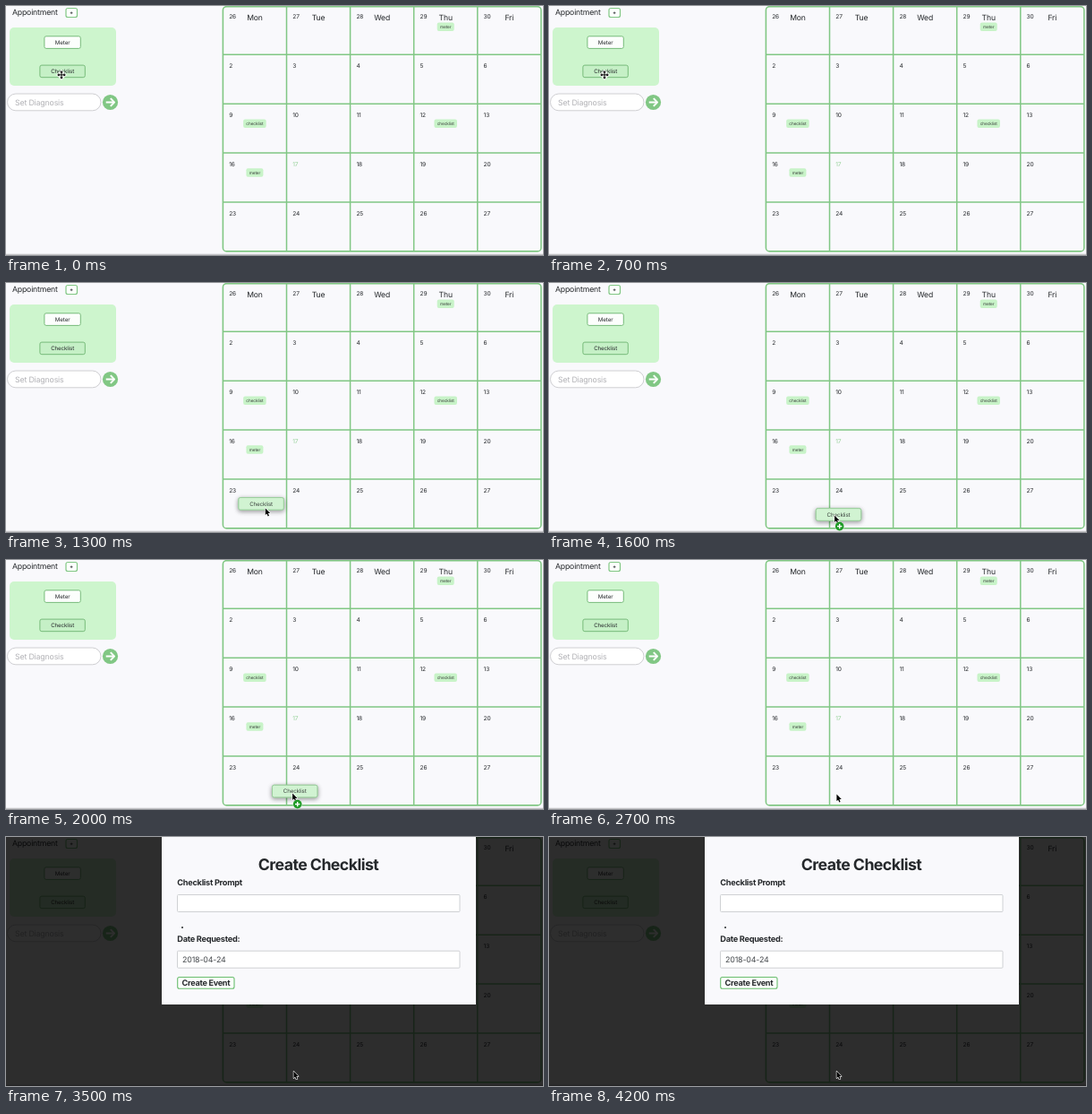
These frames come from a looping animation (600x278 px, 4.3 s). An HTML page with a canvas:

```html
<!DOCTYPE html>
<html lang="en">
<head>
<meta charset="utf-8">
<title>Drag a checklist onto the calendar</title>
<style>
  html, body { margin: 0; width: 100%; height: 100%; overflow: hidden; background: #f9f9fc; }
  canvas { display: block; width: 600px; height: 278px; }
</style>
</head>
<body>
<canvas id="stage"></canvas>
<script>
const W = 600, H = 278, LOOP = 4300, STEP = 100;
const DRAG_START = 900, DRAG_TIME = 600, DRAG_END = DRAG_START + DRAG_TIME;
const DROP = 2500, MODAL_START = 2800;
const PAGE = '#f9f9fc', INK = '#25282b', GREEN = '#81c784', MINT = '#cdf5cd';

const canvas = document.getElementById('stage');
const ctx = canvas.getContext('2d');
const ratio = window.devicePixelRatio || 1;
canvas.width = W * ratio;
canvas.height = H * ratio;

const clamp = k => Math.min(1, Math.max(0, k));
const mix = (a, b, k) => a + (b - a) * k;
const easeInOut = (k, power) =>
  k < 0.5 ? (2 * k) ** power / 2 : 1 - (2 - 2 * k) ** power / 2;

// The sideways move sets off earlier than the fall, which bends the path.
function dragTo(t, from, to) {
  const k = clamp((t - DRAG_START) / DRAG_TIME);
  return [mix(from[0], to[0], easeInOut(k, 3)), mix(from[1], to[1], easeInOut(k, 5))];
}

const settled = t => clamp((t - DRAG_END) / (DROP - DRAG_END));

function ghostAt(t) {
  const [x, y] = dragTo(t, [63, 73], [323.7, 258.6]);
  return [x - 2 * settled(t), y - settled(t)];
}

function pointerAt(t) {
  const lead = 17;
  const [x, y] = dragTo(t + lead, [63, 77], [318.8, 259.2]);
  return [x + 2.6 * settled(t), y + 2.4 * settled(t)];
}

function text(str, x, y, size, { color = INK, bold = false, align = 'left' } = {}) {
  ctx.font = `${bold ? 700 : 400} ${size}px Inter, "Open Sans", sans-serif`;
  ctx.letterSpacing = `${(bold ? -0.03 : -0.02) * size}px`;
  ctx.textRendering = 'geometricPrecision';
  ctx.textAlign = align;
  ctx.fillStyle = color;
  ctx.fillText(str, x, y);
}

function box(x, y, w, h, r, fill, stroke, line = 1) {
  ctx.beginPath();
  ctx.roundRect(x, y, w, h, r);
  if (fill) {
    ctx.fillStyle = fill;
    ctx.fill();
  }
  if (stroke) {
    ctx.strokeStyle = stroke;
    ctx.lineWidth = line;
    ctx.stroke();
  }
}

function line(color, width, x0, y0, x1, y1) {
  ctx.beginPath();
  ctx.moveTo(x0, y0);
  ctx.lineTo(x1, y1);
  ctx.strokeStyle = color;
  ctx.lineWidth = width;
  ctx.stroke();
}

function plus(x, y, reach, width, color) {
  line(color, width, x - reach, y, x + reach, y);
  line(color, width, x, y - reach, x, y + reach);
}

function disc(x, y, r, color) {
  ctx.beginPath();
  ctx.arc(x, y, r, 0, Math.PI * 2);
  ctx.fillStyle = color;
  ctx.fill();
}

function button(label, x, y, w, fill, border = '#76bb79', color = INK) {
  const h = 13.6;
  box(x - w / 2, y - h / 2, w, h, 2, fill, border);
  text(label, x, y + 2.3, 6.2, { align: 'center', color });
}

function chip(label, x, y, w) {
  box(x - w / 2, y - 4.8, w, 9.6, 2, '#c8f3c8');
  text(label, x, y + 1.6, 4.75, { align: 'center', color: '#3a403c' });
}

function drawSidebar() {
  text('Appointment', 7, 10, 8.7);
  box(67, 2.5, 12.5, 10, 2, '#fdfffd', GREEN, 1.2);
  plus(73.1, 7.7, 1.4, 0.7, INK);

  box(4, 24, 119, 65, 5, MINT);
  button('Meter', 63.1, 40.6, 40.4, '#fcfefc');
  button('Checklist', 63.1, 72.9, 50.4, '#c5f0c6');

  box(1.5, 98, 104.5, 18.8, 9.4, '#fff', '#cfcfd2');
  text('Set Diagnosis', 10, 110.7, 8.8, { color: '#b2b2b6' });
  const x = 116.5, y = 107.5;
  disc(x, y, 8.6, GREEN);
  line('#fff', 2, x - 4.8, y, x + 4.2, y);
  for (const side of [-1, 1]) line('#fff', 2, x + 0.3, y + 4.4 * side, x + 4.9, y - 0.4 * side);
}

function drawCalendar() {
  const size = 5, rowY = row => 54.9 * row - 0.6, colX = col => 242.4 + 71.1 * col;
  const dayX = col => colX(col) + 35.5;
  box(colX(0), 0.7, colX(size) - colX(0), rowY(size) - 0.7, 4, null, GREEN, 1.6);
  for (let i = 1; i < size; i++) {
    line(GREEN, 1.5, colX(i), 0, colX(i), rowY(size));
    line(GREEN, 1.5, colX(0), rowY(i), colX(size), rowY(i));
  }

  const firstDate = 26, monthLength = 31;
  ['Mon', 'Tue', 'Wed', 'Thu', 'Fri'].forEach((day, col) => {
    text(day, dayX(col), 15.8, 8.6, { align: 'center' });
    for (let row = 0; row < size; row++) {
      const date = (firstDate + col + 7 * row - 1) % monthLength + 1;
      const color = date === 17 ? '#93d096' : INK;
      text(String(date), colX(col) + 6.8, rowY(row) + 14.6, 6.6, { color });
    }
  });

  chip('meter', dayX(3), 23.3, 19);
  chip('checklist', dayX(0), 131.3, 25.5);
  chip('checklist', dayX(3), 131.3, 25.5);
  chip('meter', dayX(0), 186, 19);
}

function drawGhost(x, y) {
  ctx.save();
  ctx.shadowColor = 'rgba(0, 0, 0, .38)';
  ctx.shadowBlur = 5 * ratio;
  ctx.shadowOffsetY = 1.5 * ratio;
  button('', x, y, 50.4, '#d1f3d2', '#9bcd9d');
  ctx.restore();
  button('Checklist', x, y, 50.4, '#d1f3d2', '#9bcd9d', '#3d4440');
}

function drawArrow(x, y) {
  const shape = new Path2D('M0 0V7.6L1.7 6.1 2.9 8.9 4.2 8.3 3 5.6 5.4 5.5Z');
  ctx.save();
  ctx.translate(x, y);
  ctx.lineJoin = 'round';
  ctx.lineWidth = 1.2;
  ctx.strokeStyle = '#fff';
  ctx.stroke(shape);
  ctx.fillStyle = '#000';
  ctx.fill(shape);
  ctx.restore();
}

function drawMoveCursor(x, y) {
  const arm = new Path2D('M0 0V-3M-1.2 -2.9H1.2L0 -4.3Z');
  ctx.save();
  ctx.translate(x, y);
  for (const [color, width] of [['#fff', 2.2], ['#000', 1]]) {
    ctx.strokeStyle = color;
    ctx.lineWidth = width;
    for (let i = 0; i < 4; i++) {
      ctx.rotate(Math.PI / 2);
      ctx.stroke(arm);
    }
  }
  ctx.restore();
}

function drawBadge(x, y) {
  disc(x, y, 5.2, '#d9eed9');
  disc(x, y, 4.8, '#1f9a26');
  plus(x, y, 2.7, 1.4, '#fff');
}

function field(y) {
  box(191.5, y, 315.5, 19, 1, '#fff', '#cfd1d4');
}

function drawModal() {
  ctx.fillStyle = 'rgba(0, 0, 0, .82)';
  ctx.fillRect(0, 0, W, H);
  box(174, 0, 351, 187, 0, PAGE);
  text('Create Checklist', 349, 37.4, 17.7, { bold: true, align: 'center' });
  text('Checklist Prompt', 191.3, 53.7, 9.2, { bold: true });
  field(64.5);
  disc(197, 101, 1, INK);
  text('Date Requested:', 191.3, 116.6, 9.2, { bold: true });
  field(127.2);
  text('2018-04-24', 197, 140.2, 8.9, { color: '#45494d' });
  box(191.7, 156.5, 63.3, 12.8, 2, '#fcfefc', '#69bd6d', 1.1);
  text('Create Event', 223.4, 166.2, 9.1, { bold: true, align: 'center' });
}

function draw(t) {
  ctx.setTransform(ratio, 0, 0, ratio, 0, 0);
  ctx.fillStyle = PAGE;
  ctx.fillRect(0, 0, W, H);
  line('#b9b9bc', 1, 0, 277.3, W, 277.3);
  drawSidebar();
  drawCalendar();

  if (t < DRAG_START) {
    drawMoveCursor(62, 76.9);
    return;
  }
  if (t >= MODAL_START) drawModal();
  if (t < DROP) drawGhost(...ghostAt(t));
  const [x, y] = pointerAt(t);
  drawArrow(x, y);
  if (t >= DRAG_END && t < DROP) drawBadge(x + 5.6, y + 12.2);
}

const start = performance.now();
function tick() {
  const elapsed = (performance.now() - start) % LOOP;
  draw(Math.floor(elapsed / STEP) * STEP);
  requestAnimationFrame(tick);
}
tick();
</script>
</body>
</html>
```
